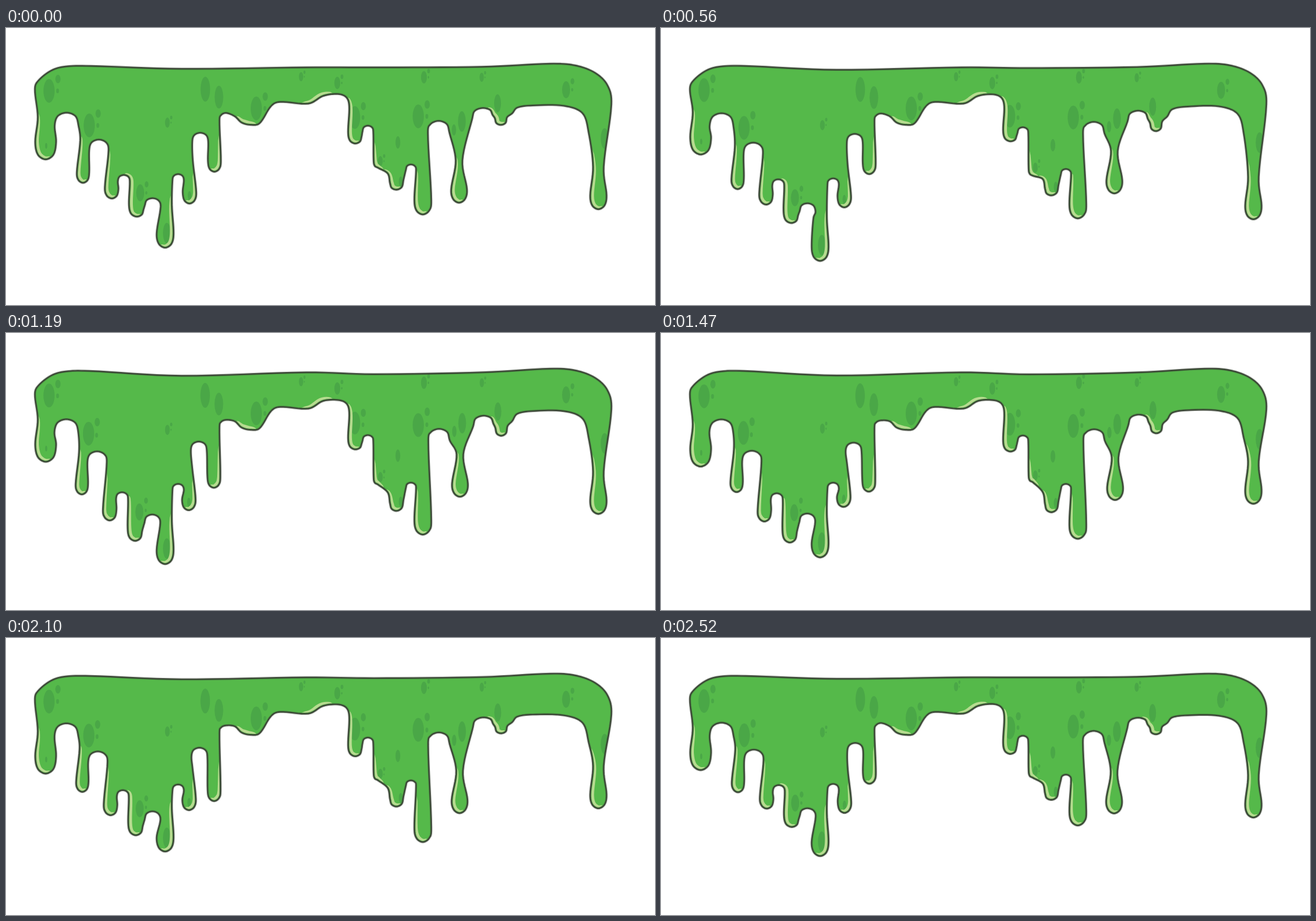
Write an HTML page with a canvas that moves like this. It is 1146 px wide and 489 px high and loops after 2.59 s.

```html
<!DOCTYPE html>
<html lang="en">
<head>
<meta charset="utf-8">
<title>Dripping slime</title>
<style>
html, body { margin: 0; width: 100%; height: 100%; overflow: hidden; background: #fff; }
canvas { display: block; }
</style>
</head>
<body>
<canvas id="stage" width="1146" height="489"></canvas>
<script>
const ctx = document.getElementById('stage').getContext('2d');
const LOOP = 2590, STEP = 70, SAMPLES = 8;
const NECK_RISE = 75, TOP = 60;

// Turns are the outline's key points: down the left, along the drips, back over the top.
// y is the highest position; the turn sinks by `drop` at time `peak` and is back at `rest`.
const turns = [];
const turn = (x, y, w, motion) =>
  turns.push({ x, y, w, drop: 0, peak: 1450, rest: 0, side: 0, lit: 0, neck: 0, ...motion });
const drip = (x, y, w, motion) => turn(x, y, w, { lit: -85, ...motion });
const flat = (...points) => points.forEach(([x, y]) => turn(x, y, 0));

flat([51, 108]);
drip(70, 222, 18.5, { drop: 19, peak: 1800, rest: 850, neck: 14 });
turn(107, 149.5, 21, { drop: 3 });
drip(136, 271, 11, { drop: 16, peak: 860, rest: 2300, neck: 5 });
turn(164, 197, 17, { drop: 12, peak: 1200 });
drip(186.5, 301, 12, { drop: 32, peak: 1420 });
turn(208, 259.5, 10.5, { drop: 23.5 });
drip(230, 333, 13, { drop: 37, rest: 30 });
turn(259, 300.5, 14, { drop: 20, peak: 1200 });
drip(281, 377, 15, { drop: 38, peak: 820, rest: 2130, neck: 12, lit: 95 });
turn(304, 257.5, 10, { drop: 10, peak: 850, rest: 2450 });
drip(324, 303, 12, { drop: 14.5, peak: 780, rest: 1850, neck: 6, lit: 60 });
turn(343, 185, 14, { drop: 10, peak: 1950 });
drip(368, 253, 11.5, { drop: 35, peak: 2120, rest: 50, lit: 70 });
turn(389, 150, 12, { drop: 5, peak: 1950, side: -1 });
flat([404, 156], [416, 167]);
drip(432, 171, 0, { lit: -30 });
flat([448, 168], [468, 138], [484, 130.5]);
drip(534, 133.5, 0, { lit: 45 });
flat([560, 120]);
turn(586, 116.5, 20, { drop: 2, side: 1 });
drip(616, 200, 12, { drop: 10.5, peak: 1700, rest: 650 });
turn(639, 172.5, 9.5, { drop: 8.5 });
drip(657, 247, 8, { drop: 22, peak: 950, side: -1, lit: -45 });
turn(674, 257, 0, { drop: 25, peak: 1300 });
drip(690, 285.5, 12, { drop: 31, lit: -45 });
turn(715, 241, 9, { drop: 25.5, peak: 1480 });
drip(736, 329, 15, { drop: 39, peak: 1880, rest: 40 });
turn(764, 164, 19, { drop: 6, peak: 1550 });
drip(800, 287, 14, { drop: 24, peak: 2350, rest: 910, neck: 6 });
turn(841, 140, 18, { drop: 7, peak: 850, rest: 2250 });
drip(874, 168, 11, { drop: 16, peak: 820, rest: 2250, lit: -40 });
turn(930, 135, 36, { drop: 4, peak: 800, rest: 1900, side: -1 });
turn(985, 136.5, 44, { drop: 2, peak: 800, rest: 1900, side: 1 });
drip(1046, 295, 14.5, { drop: 44, peak: 730, rest: 1720, neck: 9.5, lit: -110 });
flat([1069, 135]);
const bottomCount = turns.length;
flat([1062, 101], [1040, 79], [1005, 66], [960, 63]);
turn(840, 68.5, 0, { drop: 1 });
turn(650, 69.5, 0, { drop: 3.5 });
flat([530, 69.5]);
turn(310, 72, 0, { drop: 3.5, peak: 1100 });
flat([150, 67], [105, 68], [80, 75], [57, 93]);

// x, y and height; a cluster has two smaller spots beside its large one.
const clusters = [
  [76, 111, 21], [147, 172, 21], [237, 291, 15], [285, 167, 9], [442, 142, 21],
  [616, 158, 20], [728, 156, 21], [738, 87, 11], [840, 87, 8], [989, 109, 15],
  [521, 86, 8], [585, 97, 11], [661, 235, 9]
];
const singles = [
  [352, 108, 22], [376, 122, 20], [284, 362, 18], [324, 296, 8], [692, 202, 11],
  [697, 271, 9], [791, 180, 10], [805, 165, 18], [868, 133, 16], [1057, 195, 18], [71, 208, 5]
];
const spots = singles.map(([x, y, s]) => [x, y, s * .38, s]);
for (const [x, y, s] of clusters)
  spots.push([x, y, s * .47, s], [x + s * .75, y - s, s * .22, s * .36], [x + s * .72, y, s * .12, s * .2]);

const mod = t => (t % LOOP + LOOP) % LOOP;

// Eases 0 to 1 from rest to peak, then back.
function swing(t, peak, rest) {
  const rise = mod(peak - rest), now = mod(t - rest);
  const u = now < rise ? now / rise : 1 + (now - rise) / (LOOP - rise);
  return (1 - Math.cos(Math.PI * u)) / 2;
}

const bump = (x, from, to) => x > from && x < to ? Math.sin(Math.PI * (x - from) / (to - from)) : 0;
const lean = x => 2 * bump(x, 740, 900) - 4 * bump(x, 100, 270) - 3 * bump(x, 315, 375);

function pose(t) {
  const sway = swing(t, 1600, 0);
  return turns.map(k => ({
    ...k, x: k.x + lean(k.x) * sway, y: k.y + k.drop * swing(t, k.peak, k.rest)
  }));
}

// One half of a rounded end, from its wall in towards its middle.
function halfCap(k, other, dir) {
  if (!k.w || k.side === -dir) return [];
  const h = other.y - k.y;
  const reach = Math.sign(h) * Math.min(Math.abs(h) * .4, k.w * (h < 0 ? 1.7 : 1.1));
  const points = [
    { x: k.x + dir * k.w, y: k.y + reach },
    { x: k.x + dir * k.w * .75, y: k.y + reach * .27 }
  ];
  if (k.neck && h < -100) points.unshift({ x: k.x + dir * k.neck, y: k.y - NECK_RISE });
  return points;
}

function outline(posed) {
  const n = posed.length;
  return posed.flatMap((k, i) => [
    ...halfCap(k, posed[(i + n - 1) % n], -1), k,
    ...halfCap(k, posed[(i + 1) % n], 1).reverse()
  ]);
}

// Cubic through b and c, with slopes set by unevenly spaced neighbours.
function cubic(a, b, c, d, ta, tc, td, t) {
  const u = t / tc, m = (c - a) / (tc - ta) * tc, n = (d - b) / td * tc;
  return b + u * (m + u * (3 * (c - b) - 2 * m - n + u * (2 * (b - c) + m + n)));
}

function smooth(points) {
  const n = points.length;
  const gap = (p, q) => Math.sqrt(Math.hypot(q.x - p.x, q.y - p.y));
  return points.flatMap((b, i) => {
    const [a, c, d] = [-1, 1, 2].map(k => points[(i + k + n) % n]);
    const h = gap(b, c), times = [-gap(a, b), h, h + gap(c, d)];
    return Array.from({ length: SAMPLES }, (_, s) => ({
      x: cubic(a.x, b.x, c.x, d.x, ...times, h * s / SAMPLES),
      y: cubic(a.y, b.y, c.y, d.y, ...times, h * s / SAMPLES)
    }));
  });
}

function trace(points) {
  ctx.beginPath();
  points.forEach(p => ctx.lineTo(p.x, p.y));
  ctx.closePath();
}

// Index reached after following the edge for a given length.
function walk(edge, i, dir, length) {
  while (length > 0) {
    const p = edge[i], q = edge[i += dir];
    length -= Math.hypot(q.x - p.x, q.y - p.y);
  }
  return i;
}

// Tapered pale band just inside the edge.
function shine(edge, middle, lit) {
  const dir = Math.sign(lit);
  const ends = [walk(edge, middle, dir, Math.abs(lit)), walk(edge, middle, -dir, 9)];
  const start = Math.min(...ends), end = Math.max(...ends);
  const outer = [], inner = [];
  for (let i = start; i <= end; i++) {
    const p = edge[i], a = edge[i - 1], b = edge[i + 1];
    const len = Math.hypot(b.x - a.x, b.y - a.y) || 1;
    const nx = (b.y - a.y) / len, ny = (a.x - b.x) / len;
    const w = 2 + 5 * Math.sqrt(Math.max(0, Math.sin(Math.PI * (i - start) / (end - start))));
    outer.push({ x: p.x + nx * 2, y: p.y + ny * 2 });
    inner.unshift({ x: p.x + nx * w, y: p.y + ny * w });
  }
  trace(outer.concat(inner));
  ctx.fill();
}

// Spots stretch with the slime: more the nearer they are to the lower edge.
function drawSpot([x, y, rx, ry], posed) {
  let i = 0;
  while (i < bottomCount - 2 && turns[i + 1].x < x) i++;
  const a = turns[i], b = turns[i + 1], p = posed[i], q = posed[i + 1];
  const f = (x - a.x) / (b.x - a.x);
  const mix = (u, v) => u + (v - u) * f;
  const depth = Math.min(1, Math.max(0, (y - TOP) / (mix(a.y, b.y) - TOP))) ** 1.5;
  const dx = mix(p.x - a.x, q.x - b.x) * depth;
  const dy = mix(p.y - posedStart[i].y, q.y - posedStart[i + 1].y) * depth;
  ctx.beginPath();
  ctx.ellipse(x + dx, y + dy, rx, ry, 0, 0, 7);
  ctx.fill();
}

function stroke(color, width) {
  ctx.strokeStyle = color;
  ctx.lineWidth = width;
  ctx.stroke();
}

const posedStart = pose(0);

function draw(t) {
  const posed = pose(t), points = outline(posed), edge = smooth(points);
  ctx.fillStyle = '#fff';
  ctx.fillRect(0, 0, 1146, 489);
  ctx.save();
  trace(edge);
  ctx.fillStyle = '#55b94a';
  ctx.fill();
  ctx.clip();
  ctx.fillStyle = '#4aa747';
  spots.forEach(s => drawSpot(s, posed));
  ctx.fillStyle = '#b7dc90';
  posed.filter(k => k.lit).forEach(k => shine(edge, points.indexOf(k) * SAMPLES, k.lit));
  ctx.restore();

  trace(edge);
  ctx.lineJoin = 'round';
  stroke('rgba(55, 65, 50, .3)', 4.6);
  stroke('#3a4635', 2.4);
}

const begin = performance.now();
function tick() {
  const t = (performance.now() - begin) % LOOP;
  draw(Math.floor(t / STEP) * STEP);
  requestAnimationFrame(tick);
}
tick();
</script>
</body>
</html>
```
